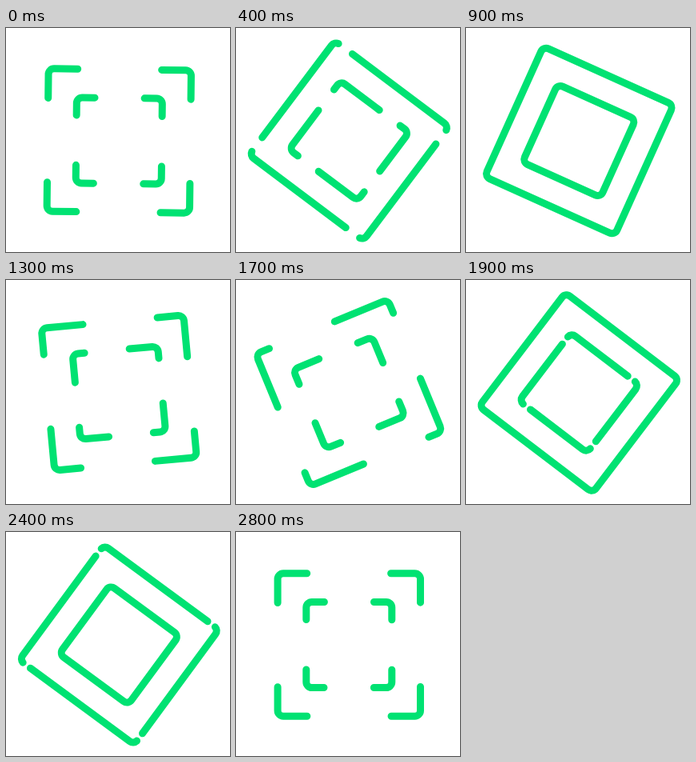
These frames come from a looping animation (280x280 px, 2.9 s). An HTML page with a canvas:

```html
<!DOCTYPE html>
<html lang="en">
<head>
<meta charset="utf-8">
<title>Turning squares</title>
<style>
  html, body { margin: 0; width: 100%; height: 100%; overflow: hidden; background: #fff; }
  canvas { display: block; }
</style>
</head>
<body>
<canvas id="stage" width="280" height="280"></canvas>
<script>
const ctx = document.getElementById('stage').getContext('2d');
const LOOP = 2900, CYCLE = 1400, STEP = 100;
const COLOR = '#00e272', CENTER_X = 141.3, CENTER_Y = 141, RADIUS = 7;

// Both edges of each gap run to the next corner, closing it, and on to their resting place.
const squares = [
  {
    half: 89.2, direction: -1,
    start: { rest: 0.2, closed: 685, sharpness: 4.4, reopen: 900 },
    end: { rest: 0.8, closed: 590, sharpness: 2.7, reopen: 900 }
  },
  {
    half: 53.5, direction: 1,
    start: { rest: 0.2, closed: 820, sharpness: 3.15, reopen: 1150 },
    end: { rest: 0.8, closed: 850, sharpness: 3.3, reopen: 1000 }
  }
];

const progress = (t, from, to) => Math.min(1, Math.max(0, (t - from) / (to - from)));

// S-curve from 0 to 1; higher powers are steeper, a higher lag comes later.
function ease(u, rise, settle = rise, lag = 1) {
  const done = u ** rise;
  return done / (done + lag * (1 - u) ** settle);
}

// Position in side lengths past a corner.
function edgeAt({ rest, closed, sharpness, reopen }, phase) {
  const closing = ease(progress(phase, 0, closed), sharpness);
  const opening = ease(progress(phase, reopen, CYCLE), 1.5);
  return rest + (1 - rest) * closing + rest * opening;
}

// Half a turn clockwise, then back.
function angleAt(t) {
  const turn = t < CYCLE
    ? ease(progress(t, -10, CYCLE), 1, 1.6, 1.95)
    : 1 - ease(progress(t, CYCLE, 2 * CYCLE), 1.5);
  return turn * Math.PI;
}

function drawSquare({ half, direction, start, end }, phase) {
  const side = 2 * half - (2 - Math.PI / 2) * RADIUS;
  const from = edgeAt(start, phase) * side;
  const to = edgeAt(end, phase) * side;
  const gap = to - from;

  ctx.save();
  ctx.scale(direction, 1);
  ctx.setLineDash(gap > 0.5 ? [side - gap, gap] : []);
  ctx.lineDashOffset = -(side / 2 + to);
  ctx.beginPath();
  ctx.moveTo(0, -half);
  ctx.arcTo(half, -half, half, half, RADIUS);
  ctx.arcTo(half, half, -half, half, RADIUS);
  ctx.arcTo(-half, half, -half, -half, RADIUS);
  ctx.arcTo(-half, -half, half, -half, RADIUS);
  ctx.closePath();
  ctx.stroke();
  ctx.restore();
}

function draw(time) {
  const t = Math.floor((time % LOOP) / STEP) * STEP;
  const phase = t < 2 * CYCLE ? t % CYCLE : 0;

  ctx.fillStyle = '#fff';
  ctx.fillRect(0, 0, 280, 280);
  ctx.save();
  ctx.translate(CENTER_X, CENTER_Y);
  ctx.rotate(angleAt(t));
  ctx.strokeStyle = COLOR;
  ctx.lineWidth = 9;
  ctx.lineCap = 'round';
  squares.forEach(square => drawSquare(square, phase));
  ctx.restore();
}

const origin = performance.now();
function tick() {
  draw(performance.now() - origin);
  requestAnimationFrame(tick);
}
tick();
</script>
</body>
</html>
```
